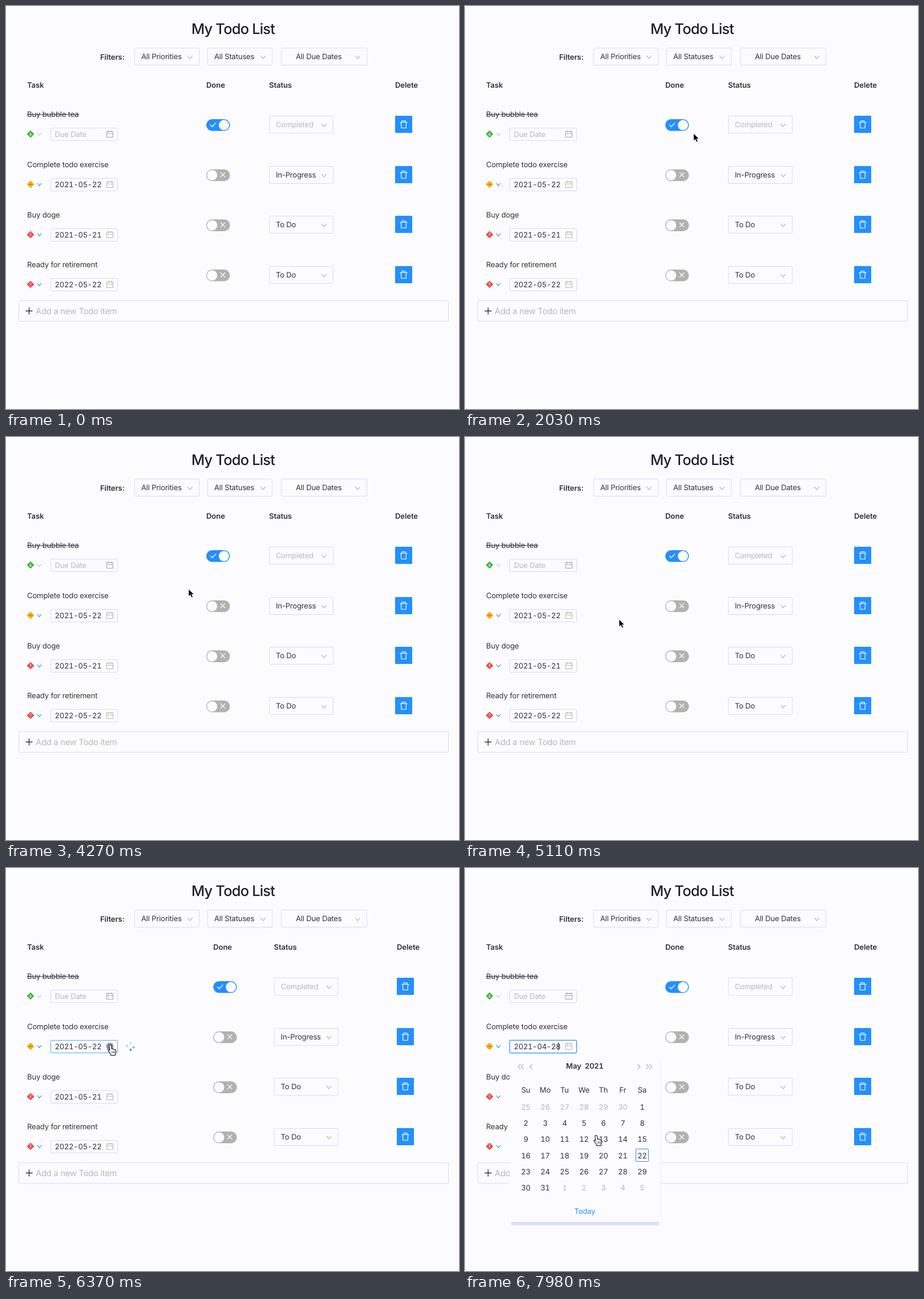
Animation, 794 px wide and 705 px high, one loop 8 s. Source, as an HTML page:

```html
<!DOCTYPE html>
<html lang="en">
<head>
<meta charset="utf-8">
<title>My Todo List</title>
<style>
  html, body { margin: 0; width: 100%; height: 100%; overflow: hidden; background: #fcfcff; }
  svg { display: block; }
  text { font: 13.1px Inter, sans-serif; letter-spacing: -.2px; fill: #30303a; text-rendering: geometricPrecision; }
  .title { font-size: 25.5px; letter-spacing: -.85px; fill: #20202a; font-weight: 500; }
  .head { font-weight: 600; letter-spacing: -.1px; }
  .task { letter-spacing: -.17px; }
  .date { font-variant-numeric: tabular-nums; letter-spacing: -.3px; }
  .add { font-size: 14.8px; letter-spacing: -.28px; }
  .mid { text-anchor: middle; }
  .dim { fill: #b8b8bc; }
  .link { fill: #248fff; }
  .box { fill: #fcfcff; stroke: #d8d8fa; }
  .line { fill: none; stroke-linecap: round; stroke-linejoin: round; }
</style>
</head>
<body>
<svg id="stage" width="794" height="705" viewBox="0 0 794 705"></svg>
<script>
const BLUE = '#248fff', HOVER = '#55a9ff', GRAY = '#b2b2ac';
const LOAD_START = 6250, LOAD_END = 6850, OPEN = 7530, PREVIEW = 7900;

const text = (x, y, str, cls = '', more = '') =>
  `<text x="${x}" y="${y + 4.7}" class="${cls}" ${more}>${str}</text>`;
const box = (x, y, w, h, more = '') =>
  `<rect x="${x}" y="${y}" width="${w}" height="${h}" rx="1.5" class="box" ${more}/>`;
const line = (d, color, width = 1.1) =>
  `<path class="line" d="${d}" stroke="${color}" stroke-width="${width}"/>`;
const chevron = (x, y, color = GRAY, r = 4) =>
  line(`M${x - r} ${y - r / 2}l${r} ${r * 1.2} ${r} ${-r * 1.2}`, color);
const group = (id, body) => `<g id="${id}">${body}</g>`;

const select = (x, y, w, label, cls = '', textX = x + 11.5) =>
  box(x, y - 15, w, 30) + text(textX, y, label, cls) + chevron(x + w - 16, y + .8);

const calendarIcon = (x, y, color) =>
  line(`M${x - 5.5} ${y - 4.5}h11v10h-11zM${x - 5.5} ${y - .8}h11M${x - 2.7} ${y - 6}v2.7M${x + 2.7} ${y - 6}v2.7`, color);

const priority = (x, y, color, mark) =>
  `<path d="M${x} ${y - 6}l6 6-6 6-6-6z" fill="${color}" stroke="${color}" stroke-linejoin="round"/>` + mark(x, y);
const marks = {
  low: (x, y) => line(`M${x} ${y - 2.5}v5m-1.8-1.8 1.8 1.8 1.8-1.8`, '#e8ffe8', 1),
  medium: (x, y) => line(`M${x - 3} ${y}h6`, '#c98500', 1.3),
  high: (x, y) => line(`M${x} ${y - 3}v3.4m0 2.4v.1`, '#fff', 1.3),
};

function toggle(y, on) {
  const mark = on
    ? line(`M358.5 ${y}l3 3.2 6.2-6.6`, '#fff', 1.3)
    : line(`M376.2 ${y - 4.3}l7.6 7.6m0-7.6-7.6 7.6`, '#fff', 1.2);
  return `<rect x="351" y="${y - 10}" width="41.5" height="20.6" rx="10.3" fill="${on ? BLUE : GRAY}"/>` +
    `<circle cx="${on ? 382 : 361.3}" cy="${y + .3}" r="9" fill="#fcfcff"/>` + mark;
}

const deleteButton = y =>
  `<rect x="682" y="${y - 15}" width="30" height="30" rx="1" fill="${BLUE}"/>` +
  line(`M690.8 ${y - 3.5}h12.4M694 ${y - 3.7}v-2.5h6v2.5M692.3 ${y - 3.3}l.7 9.8h8l.7-9.8`, '#fff', 1.2);

const rows = [
  { task: 'Buy bubble tea', date: 'Due Date', status: 'Completed', level: 'low', color: '#46b446', done: true },
  { task: 'Complete todo exercise', date: '2021-05-22', status: 'In-Progress', level: 'medium', color: '#ffac0a' },
  { task: 'Buy doge', date: '2021-05-21', status: 'To Do', level: 'high', color: '#f24a4e' },
  { task: 'Ready for retirement', date: '2022-05-22', status: 'To Do', level: 'high', color: '#f24a4e' },
];

let tasks = '';
let doneCol = text(351, 138, 'Done', 'head');
let statusCol = text(461, 138, 'Status', 'head');
let deleteCol = text(682, 138, 'Delete', 'head');
rows.forEach((row, i) => {
  const y = 207.5 + i * 87.67, dateY = Math.round(y + 16.8), active = i === 1;
  tasks += text(37, y - 18, row.task, 'task') +
    (row.done ? line(`M37 ${y - 17.5}h91`, '#30303a') : '') +
    priority(43, dateY, row.color, marks[row.level]) +
    chevron(58.5, dateY, row.done ? '#c8c8cc' : BLUE, 3.5) +
    box(78.5, dateY - 10.5, 117, 22, active ? 'id="dateBox"' : '') +
    text(85.5, dateY + .3, row.date, row.done ? 'dim' : 'date', active ? 'id="dateText"' : '') +
    calendarIcon(182, dateY, row.done ? '#a4a4b4' : '#babaa8');
  const middle = Math.round(y - .5);
  doneCol += toggle(y + .5, row.done);
  statusCol += select(461.5, middle + .5, 112, row.status, row.done ? 'dim' : '');
  deleteCol += deleteButton(middle);
});

const spinner = [15, 85, 187, 280].map((angle, i) => {
  const a = angle * Math.PI / 180;
  return `<circle cx="${6 * Math.cos(a)}" cy="${6 * Math.sin(a)}" r="2.2" fill="${BLUE}" opacity="${[.55, .8, .3, .25][i]}"/>`;
}).join('');

function calendar() {
  const arrow = (x, dir) => line(`M${x + 2 * dir} 343.5l${-4 * dir} 4 ${4 * dir} 4`, '#b0b0b6');
  let out = '<rect x="81" y="618" width="259" height="7" rx="2" fill="#dcdcfd"/>' +
    '<rect x="78" y="337" width="265" height="282" fill="#fcfcff"/>' +
    '<path d="M343 338v273" stroke="#e2e2fa" stroke-dasharray="1 1"/>' +
    arrow(95, 1) + arrow(100.5, 1) + arrow(115.5, 1) + arrow(305, -1) + arrow(320, -1) + arrow(325.5, -1) +
    text(177, 346.5, 'May', 'head') + text(210, 346.5, '2021', 'head date');
  ['Su', 'Mo', 'Tu', 'We', 'Th', 'Fr', 'Sa'].forEach((day, i) => out += text(106.5 + 34 * i, 388.5, day, 'mid'));
  for (let i = 0; i < 42; i++) {
    const date = new Date(2021, 3, 25 + i), x = 106.5 + 34 * (i % 7), y = 418 + 28.3 * Math.floor(i / 7);
    const inMonth = date.getMonth() === 4, day = date.getDate();
    if (inMonth && day === 22) out += box(x - 11, y - 11.4, 22, 22, `style="stroke:${BLUE}"`);
    out += text(x, y, day, inMonth ? 'mid date' : 'mid date dim');
  }
  return out + text(210, 600, 'Today', 'mid link');
}

document.getElementById('stage').innerHTML =
  text(325, 44.2, 'My Todo List', 'title') +
  text(165, 89, 'Filters:', 'head') +
  select(225.5, 88.5, 113, 'All Priorities') +
  select(353.5, 88.5, 113, 'All Statuses') +
  select(482.5, 88.5, 150, 'All Due Dates', '', 508) +
  text(37, 138, 'Task', 'head') + tasks +
  group('doneCol', doneCol) + group('statusCol', statusCol) + group('deleteCol', deleteCol) +
  box(22.5, 515.5, 753, 36) + line('M35 533.5h11M40.5 528v11', '#30303a', 1.4) +
  text(52, 534.3, 'Add a new Todo item', 'add dim') +
  group('clear', '<circle cx="182" cy="312" r="7" fill="#fcfcff"/><circle cx="182" cy="312" r="6.3" fill="#8c8ca4"/>') +
  group('caret', line('M164 305v14', '#30303a', 1)) +
  group('spinner', spinner) +
  group('calendar', calendar()) +
  group('arrow', '<path d="M0 0v13l3-2.7 2.2 4.7 2.4-1.1-2.2-4.5 4-.2z" fill="#000" stroke="#fff" stroke-width=".8"/>') +
  group('hand', '<path transform="translate(-3.5)" d="M2 2.2C1.9.2 5.2-.2 5.5 2L6 7c1-1 2.5-.5 2.5.5 1-.7 2.3 0 2.3 1 1.2-.5 2.2.3 2.2 1.5 0 3-1 4-1.3 7.2H4.8C4 13.5 1 11.4.3 9.7 0 8.3 1.5 8 2.9 9.4z" fill="#fff" stroke="#222" stroke-width="1.1" stroke-linejoin="round"/><path d="M3 10.5v3.5M5.2 10.5v3.5M7.3 10.5v3.5" stroke="#222" stroke-width=".8"/>');

const el = id => document.getElementById(id);
const show = (id, on) => el(id).setAttribute('visibility', on ? 'visible' : 'hidden');
const move = (id, x, y = 0, extra = '') => el(id).setAttribute('transform', `translate(${x} ${y}) ${extra}`);

// Pointer path: time, x, y
const path = [
  [300, 800, 320], [1060, 324, 220], [1140, 322, 220], [1440, 326, 222], [1630, 326, 222],
  [2420, 472, 224], [2840, 478, 223], [3240, 470, 226], [4060, 328, 258], [4270, 320, 266],
  [4870, 277, 312], [5110, 270, 319], [5950, 184, 310], [6370, 182.5, 309],
  [7520, 182.5, 309], [7980, 229.5, 467], [8000, 230, 468],
];
function pointerAt(t) {
  const i = Math.max(1, path.findIndex(p => p[0] >= t));
  const [t0, x0, y0] = path[i - 1], [t1, x1, y1] = path[i];
  const k = Math.max(0, (t - t0) / (t1 - t0)), s = k * k * (3 - 2 * k);
  return [x0 + (x1 - x0) * s, y0 + (y1 - y0) * s];
}

function draw() {
  const t = performance.now() % 8000;
  const [x, y] = pointerAt(t);
  const overDate = t > 5110 && x < 196;
  const loading = t >= LOAD_START && t < LOAD_END;
  const open = t >= OPEN, preview = t >= PREVIEW, empty = t >= LOAD_END && !preview;

  show('arrow', t >= 300 && !overDate && !open);
  show('hand', overDate || open);
  move('arrow', x, y);
  move('hand', x, y, 'scale(1.08)');

  move('doneCol', loading ? 12.2 : 0);
  move('statusCol', loading ? 8.6 : 0);
  move('deleteCol', loading ? 3 : 0);
  show('spinner', loading);
  move('spinner', 218, 312, `rotate(${(t - 6370) * .3})`);

  show('clear', overDate && t < LOAD_END);
  show('caret', preview);
  const label = el('dateText');
  label.textContent = empty ? 'Due Date' : preview ? '2021-04-28' : '2021-05-22';
  label.setAttribute('class', empty ? 'dim' : 'date');
  el('dateBox').style.cssText = open
    ? `stroke:${BLUE};filter:drop-shadow(0 0 1px #248fffaa)`
    : overDate ? `stroke:${HOVER}` : '';

  const k = Math.min(1, Math.max(0, (t - OPEN) / 200)), ease = 1 - (1 - k) ** 3;
  const scale = .8 + .2 * ease;
  show('calendar', open);
  el('calendar').setAttribute('opacity', ease);
  move('calendar', 0, 337 * (1 - scale), `scale(1 ${scale})`);
  requestAnimationFrame(draw);
}
draw();
</script>
</body>
</html>
```
